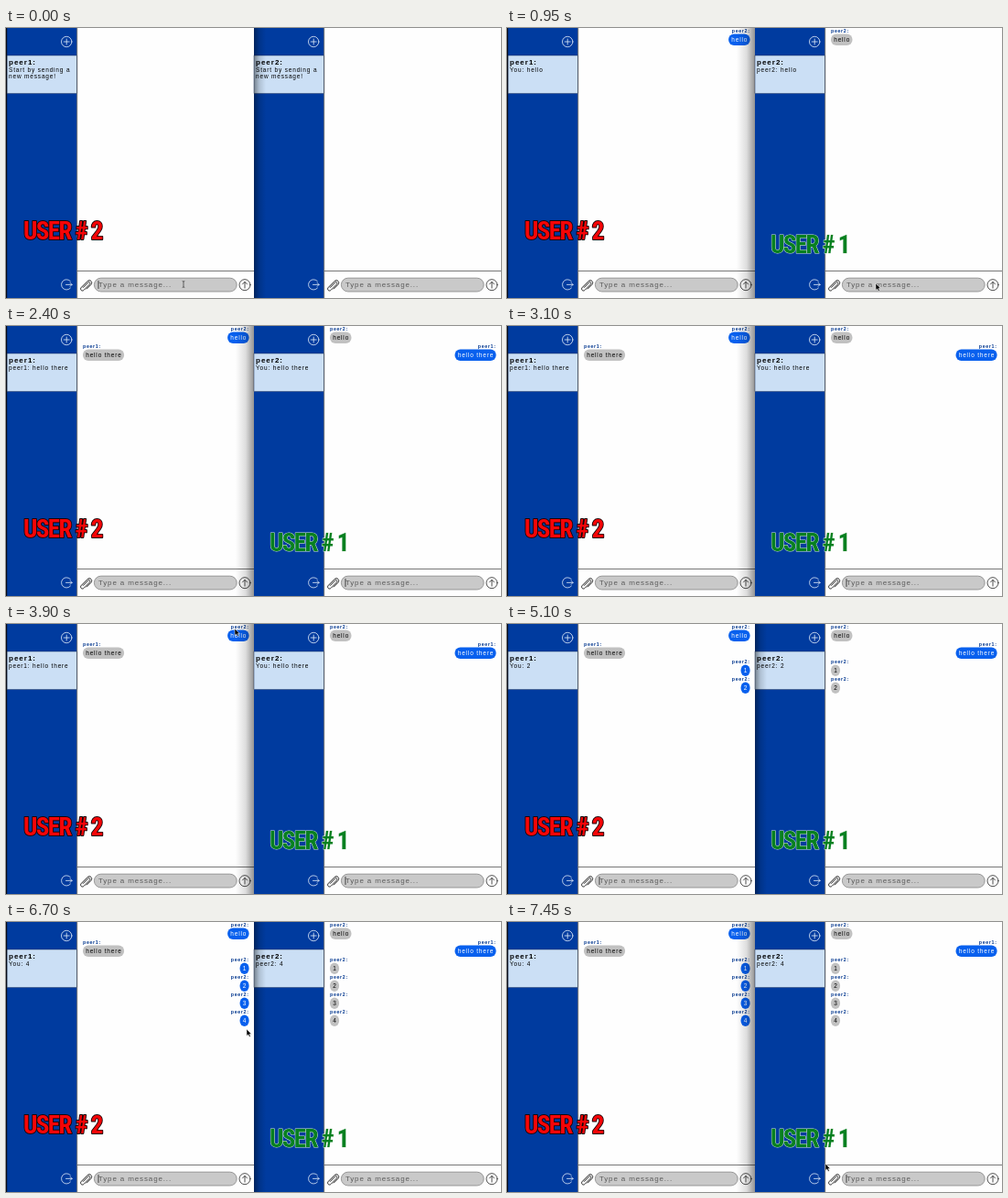
Animation, 541 px wide and 295 px high, one loop 7.5 s. Source, as an HTML page:

```html
<!DOCTYPE html>
<html lang="en">
<head>
<meta charset="utf-8">
<style>
  html, body { margin: 0; width: 100%; height: 100%; overflow: hidden; background: #fff; }
  svg { display: block; width: 541px; height: 295px; font-family: "Liberation Sans", Arial, sans-serif; }
  text { white-space: pre; }
  .title { font: bold 8px "Liberation Sans", Arial, sans-serif; letter-spacing: 1px; }
  .small { font-size: 6.5px; letter-spacing: .83px; }
  .sender { font-size: 5.3px; font-weight: bold; letter-spacing: .65px; fill: #083b91; }
  .draft { font-size: 8px; letter-spacing: .87px; }
  .icon { fill: none; stroke-linecap: round; stroke-linejoin: round; stroke-width: .8; }
  .banner {
    font: 900 27px "Roboto Condensed", Roboto, "Liberation Sans", sans-serif;
    font-stretch: 75%; letter-spacing: -1.6px; paint-order: stroke; stroke-linejoin: round;
  }
</style>
</head>
<body>
<svg id="stage" viewBox="0 0 541 295">
  <defs>
    <linearGradient id="toLeft" x1="1" x2="0">
      <stop stop-opacity=".42"/><stop offset=".45" stop-opacity=".13"/><stop offset="1" stop-opacity="0"/>
    </linearGradient>
    <linearGradient id="toRight">
      <stop stop-opacity=".42"/><stop offset=".45" stop-opacity=".14"/><stop offset="1" stop-opacity="0"/>
    </linearGradient>
  </defs>
</svg>
<script>
const LOOP = 7500;
const USERS = ["peer1", "peer2"];
const stage = document.getElementById("stage");

function add(parent, tag, attrs = {}, text = "") {
  const node = document.createElementNS("http://www.w3.org/2000/svg", tag);
  for (const key in attrs) node.setAttribute(key, attrs[key]);
  node.textContent = text;
  parent.append(node);
  return node;
}
const show = (node, on) => node.setAttribute("visibility", on ? "inherit" : "hidden");

// Author, text, first key press, last key press, sending time
const messages = [
  [1, "hello", 150, 550, 650],
  [0, "hello there", 1150, 1900, 2000],
  [1, "1", 4400, 4400, 4550],
  [1, "2", 4780, 4780, 4900],
  [1, "3", 5160, 5160, 5300],
  [1, "4", 5560, 5560, 5700]
].map(([author, text, start, end, sent]) => ({ author, text, start, end, sent }));

function addBubble(parent, message, row, own) {
  const group = add(parent, "g");
  const y = 19 * row;
  const label = add(group, "text", { class: "sender", y: y + 5 }, USERS[message.author] + ":");
  const box = add(group, "rect", { y: y + 6.5, height: 12.6, rx: 6, fill: own ? "#0860ee" : "#c1c1c1" });
  const text = add(group, "text", { class: "small", y: y + 15.2, fill: own ? "#fff" : "#000" }, message.text);
  const width = text.getComputedTextLength() + 5.6;
  const x = own ? 265.6 - width : 84;
  box.setAttribute("x", x);
  box.setAttribute("width", width);
  text.setAttribute("x", x + 3.2);
  label.setAttribute("x", own ? 265.6 - label.getComputedTextLength() : 84);
  return group;
}

function addWindow(owner, offset) {
  const g = add(stage, "g", { transform: `translate(${offset} 0)` });
  add(g, "rect", { x: 1, width: 270, height: 295, fill: "#fefefe" });
  add(g, "rect", { x: 1, width: 76.5, height: 295, fill: "#003b9f" });
  add(g, "rect", { x: 1, y: 30, width: 76.5, height: 41.6, fill: "#cbdff5", stroke: "#1c3560", "stroke-width": .5 });
  add(g, "path", { d: "M77.7 0V295M78 265.5H271", stroke: "#555", "stroke-width": .8 });

  const white = add(g, "g", { class: "icon", stroke: "#e8effb" });
  add(white, "circle", { cx: 66.2, cy: 15, r: 5.7 });
  add(white, "path", { d: "M63.2 15h6M66.2 12v6" });
  add(white, "path", { d: "M70.4 276.7A5.6 5.6 0 1 0 70.4 284.1M65.5 280.4h6.6m-2-2 2 2-2 2" });

  const dark = add(g, "g", { class: "icon", stroke: "#222" });
  add(dark, "path", { "stroke-width": 1, d: "M84.3 283.5l5.2-5.3c1.5-1.5 3.4.4 1.9 1.9l-6.1 6.1c-2.3 2.3-5.1-.6-2.9-2.9l6.5-6.5c2.9-2.9 6.7.9 3.8 3.8l-4.4 4.4" });
  add(dark, "circle", { cx: 261, cy: 280.7, r: 6 });
  add(dark, "path", { d: "M261 284.2v-6.8m-2.5 2.5 2.5-2.5 2.5 2.5" });
  add(g, "rect", { x: 96.4, y: 273.2, width: 155.8, height: 14.8, rx: 7.4, fill: "#c9c9c9", stroke: "#858585", "stroke-width": .8 });

  add(g, "text", { class: "title", x: 3, y: 39.8 }, USERS[1 - owner] + ":");
  return {
    owner,
    preview: [47.6, 55.2].map(y => add(g, "text", { class: "small", x: 3, y, fill: "#000" })),
    draft: add(g, "text", { class: "draft", x: 100.9, y: 283.4 }),
    caret: add(g, "path", { d: "M0 276v9", stroke: "#222", "stroke-width": .8 }),
    bubbles: messages.map((m, row) => addBubble(g, m, row, m.author === owner))
  };
}

const windows = [addWindow(1, 0), addWindow(0, 270)];
add(stage, "rect", { width: 1.2, height: 295, fill: "#080b16" });
const leftShadow = add(stage, "rect", { x: 251, width: 20, height: 295, fill: "url(#toLeft)" });
const rightShadow = add(stage, "rect", { x: 271, width: 13, height: 295, fill: "url(#toRight)" });

function addBanner(x, y, text, fill, stroke, width) {
  return add(stage, "text", { class: "banner", x, y, fill, stroke, "stroke-width": width }, text);
}
addBanner(19, 230.5, "USER # 2", "#f50507", "#16070a", 1.8);
const greenBanner = addBanner(288, 245.5, "USER # 1", "#078020", "#dcebdc", 1);

const pointer = add(stage, "g");
const arrow = add(pointer, "path", { d: "M0-3V4.4L1.7 2.9 3 5.6 4.3 5 3.1 2.4H5.3Z", fill: "#000", stroke: "#fff", "stroke-width": .5 });
const beam = add(pointer, "path", { d: "M-1.3-3.5Q0-3.5 0-2.5V2.5Q0 3.5-1.3 3.5M1.3-3.5Q0-3.5 0-2.5M0 2.5Q0 3.5 1.3 3.5", fill: "none", stroke: "#333", "stroke-width": .7 });

// Time, x, y
const trips = [
  [[0, 194, 280], [150, 194, 280]],
  [[680, 194, 280], [950, 403, 282], [1150, 403, 282]],
  [[3550, 403, 282], [3900, 250, 8], [4200, 180, 280], [4400, 180, 280]],
  [[5780, 180, 280], [6050, 137, 3], [6500, 160, 4], [6950, 405, 280], [7200, 405, 280], [7450, 348, 267], [7500, 346, 267]]
];

function pointerAt(t) {
  const trip = trips.find(p => t >= p[0][0] && t < p.at(-1)[0]);
  if (!trip) return null;
  const i = trip.findIndex(p => p[0] > t);
  const [t0, x0, y0] = trip[i - 1], [t1, x1, y1] = trip[i];
  const u = (t - t0) / (t1 - t0), e = u * u * (3 - 2 * u);
  return [x0 + (x1 - x0) * e, y0 + (y1 - y0) * e];
}

function draftAt(owner, t) {
  const m = messages.find(m => m.author === owner && t >= m.start && t < m.sent);
  if (!m) return "";
  const progress = m.end > m.start ? (t - m.start) / (m.end - m.start) : 1;
  return m.text.slice(0, 1 + Math.floor(Math.min(1, progress) * (m.text.length - 1)));
}

function focusAt(t) {
  if (t < 850) return 1;
  if (t < 1000) return null;
  return t < 4200 || t >= 7050 ? 0 : 1;
}

function updateWindow(view, t) {
  const last = messages.filter(m => t >= m.sent).at(-1);
  const lines = last
    ? [(last.author === view.owner ? "You" : USERS[last.author]) + ": " + last.text, ""]
    : ["Start by sending a", "new message!"];
  view.preview.forEach((line, i) => line.textContent = lines[i]);
  view.bubbles.forEach((bubble, i) => show(bubble, t >= messages[i].sent));

  const typed = draftAt(view.owner, t);
  view.draft.textContent = typed || "Type a message...";
  view.draft.setAttribute("fill", typed ? "#111" : "#5c5c5c");
  const caretX = 101 + (typed ? view.draft.getComputedTextLength() : 0);
  view.caret.setAttribute("transform", `translate(${caretX} 0)`);
  show(view.caret, focusAt(t) === view.owner);
}

function render(t) {
  windows.forEach(view => updateWindow(view, t));
  const rightActive = t >= 850 && t < 4200 || t >= 7050;
  show(leftShadow, rightActive);
  show(rightShadow, !rightActive);
  show(greenBanner, t >= 850);

  const place = pointerAt(t);
  show(pointer, place);
  if (place) {
    const [x, y] = place;
    const overInput = x > 96 && x < 252 && y > 273 && y < 288;
    pointer.setAttribute("transform", `translate(${x} ${y})`);
    show(beam, overInput);
    show(arrow, !overInput);
  }
}

const start = performance.now();
function tick() {
  render((performance.now() - start) % LOOP);
  requestAnimationFrame(tick);
}
render(0);
requestAnimationFrame(tick);
</script>
</body>
</html>
```
